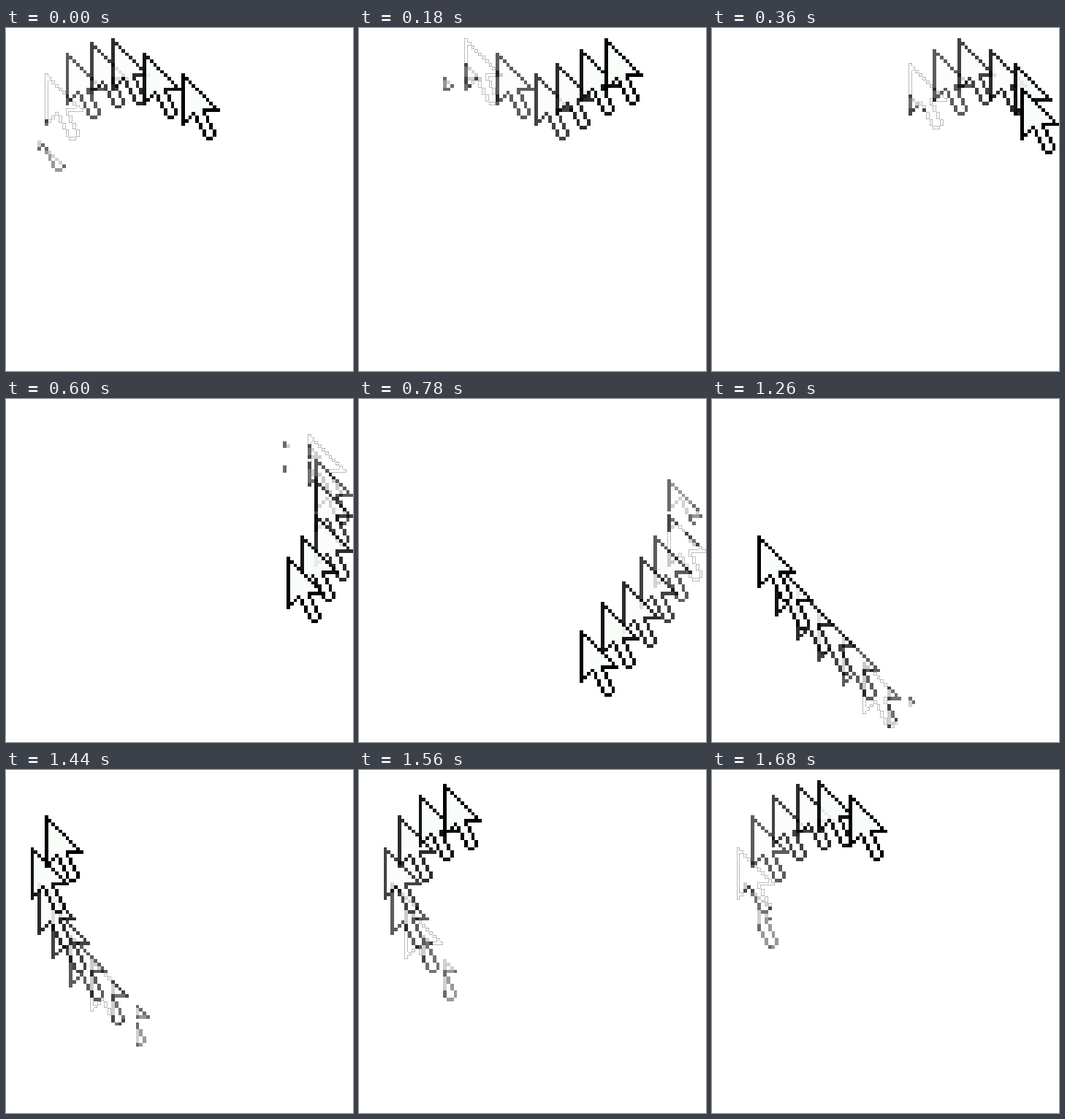
An HTML page with a canvas that plays this animation: 475x470 px, repeating every 1740 ms.

```html
<!DOCTYPE html>
<html lang="en">
<head>
<meta charset="utf-8">
<title>Pointer trail</title>
<style>
  html, body { margin: 0; width: 100%; height: 100%; overflow: hidden; background: #fff; }
  canvas { display: block; }
</style>
</head>
<body>
<canvas id="stage" width="475" height="470"></canvas>
<script>
const ctx = document.getElementById('stage').getContext('2d');
const CELL = 4.8, STEP_MS = 60;

// X is outline, . is fill
const pointer = [
  'X',
  'XX',
  ...Array.from({ length: 8 }, (_, i) => 'X' + '.'.repeat(i + 1) + 'X'),
  'X.....XXXXX',
  'X..X..X',
  'X.X X..X',
  'XX  X..X',
  'X    X..X',
  '     X..X',
  '      X..X',
  '      X..X',
  '       XX'
];

// Pointer tip at each step, in cells
const path = [
  [50, 13], [56, 10], [63, 6], [70, 3], [79, 6], [86, 10], [88, 17], [88, 23],
  [88, 33], [84, 39], [80, 45], [75, 52], [69, 58], [63, 66], [56, 73], [50, 79],
  [43, 75], [37, 67], [30, 60], [24, 54], [18, 47], [13, 39], [9, 32], [7, 22],
  [11, 13], [17, 7], [24, 4], [30, 3], [39, 7]
];

const opacity = [1, 0.92, 0.83, 0.74, 0.64, 0.55, 0.4, 0.3];
const LAST_SOLID = 4, DOTTED = 5, LAST = 6;
const colors = { X: '#000', '.': '#f9fdf9' };

const at = index => path[(index + path.length) % path.length];
const edge = n => Math.round(n * CELL);

function kindAt([px, py], x, y) {
  const kind = (pointer[y - py] || '')[x - px];
  return kind === ' ' ? undefined : kind;
}

function fillCell(x, y, color, alpha) {
  ctx.globalAlpha = alpha;
  ctx.fillStyle = color;
  ctx.fillRect(edge(x), edge(y), edge(x + 1) - edge(x), edge(y + 1) - edge(y));
}

// Thin dotted rim along the sides that do not touch another outline cell
function dotCell(pos, x, y) {
  const left = edge(x), right = edge(x + 1) - 1, top = edge(y), bottom = edge(y + 1) - 1;
  const open = (dx, dy) => kindAt(pos, x + dx, y + dy) !== 'X';
  const sides = { l: open(-1, 0), r: open(1, 0), t: open(0, -1), b: open(0, 1) };
  ctx.globalAlpha = 1;
  ctx.fillStyle = '#777';
  for (let v = top; v <= bottom; v++) {
    for (let u = left; u <= right; u++) {
      const rim = (sides.l && u === left) || (sides.r && u === right) ||
                  (sides.t && v === top) || (sides.b && v === bottom);
      if (rim && (u + v) % 2 === 0) ctx.fillRect(u, v, 1, 1);
    }
  }
}

function drawPointer(index, age) {
  const pos = at(index), previous = at(index - 1);
  pointer.forEach((row, j) => [...row].forEach((kind, i) => {
    if (kind === ' ') return;
    const x = pos[0] + i, y = pos[1] + j;
    const under = kindAt(previous, x, y);
    // Cells shared with the previous pointer linger and show it through
    if (under && age > 0) {
      fillCell(x, y, '#fff', 1);
      fillCell(x, y, colors[under], opacity[age + 1]);
    }
    if (under || age <= LAST_SOLID) fillCell(x, y, colors[kind], opacity[age]);
    else if (age === DOTTED && kind === 'X') dotCell(pos, x, y);
  }));
}

let shown = -1;
function render() {
  const step = Math.floor(performance.now() / STEP_MS - start / STEP_MS) % path.length;
  if (step !== shown) {
    shown = step;
    ctx.globalAlpha = 1;
    ctx.fillStyle = '#fff';
    ctx.fillRect(0, 0, 475, 470);
    for (let age = LAST; age >= 0; age--) drawPointer(step - age, age);
  }
  requestAnimationFrame(render);
}

const start = performance.now();
render();
</script>
</body>
</html>
```
